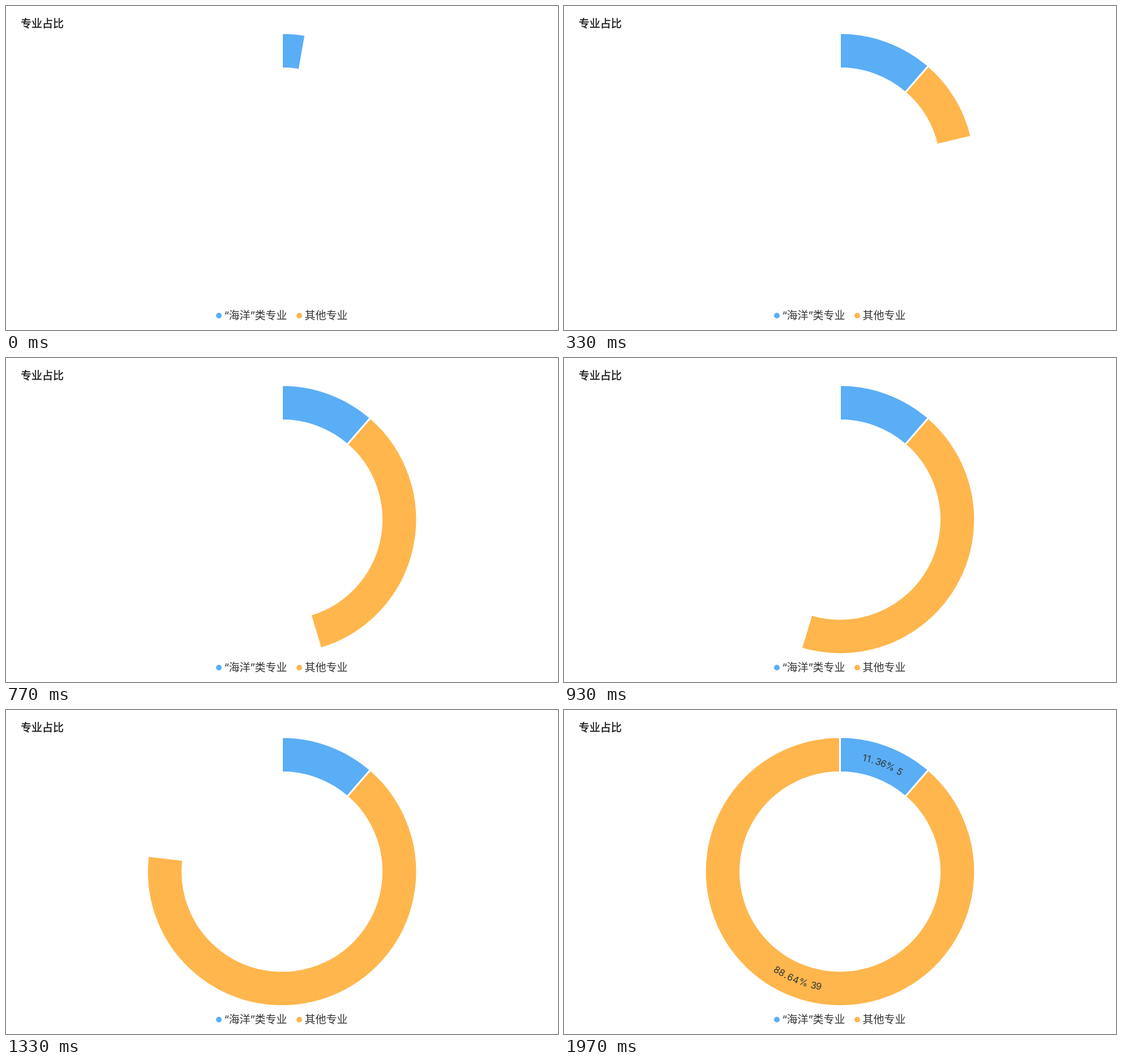
Recreate the animation shown at these times as an HTML page. Size 975 px wide and 574 px high, loop 3010 ms.

```html
<!DOCTYPE html>
<html lang="zh-CN">
<head>
<meta charset="utf-8">
<title>专业占比</title>
<style>
  html, body { margin: 0; width: 100%; height: 100%; overflow: hidden; background: #fff; }
  svg { display: block; width: 975px; height: 574px; }
  text { font: 19px "Noto Sans CJK SC", "Noto Sans CJK", sans-serif; fill: #333; }
  .title { fill: #111; stroke: #111; stroke-width: .35px; }
  .quote { font-family: Inter, sans-serif; }
  #labels text { font: 16.5px Inter, sans-serif; text-anchor: middle; }
  #ring path { stroke: #fff; stroke-width: 3; }
</style>
</head>
<body>
<svg viewBox="0 0 975 574">
  <text class="title" x="26" y="37.8">专业占比</text>
  <g transform="translate(487.5 286.25)">
    <g id="ring"></g>
    <g id="labels"></g>
  </g>
  <circle cx="376" cy="548.5" r="5" fill="#5aaef5"/>
  <text y="555.2"><tspan class="quote" x="385.5">“</tspan><tspan x="393.5">海洋</tspan><tspan class="quote" x="431.5">”</tspan><tspan x="439.5">类专业</tspan></text>
  <circle cx="518" cy="548.5" r="5" fill="#ffb64d"/>
  <text x="527.5" y="555.2">其他专业</text>
</svg>
<script>
const LOOP = 3010, LABELS_AT = 1970, FPS = 30;
const OUTER = 238.3, INNER = 176;
const START_ANGLE = 10, SPEED = 200; // degrees, degrees per second
const SPLIT = 360 * 5 / 44;

const ring = document.getElementById('ring');
const labels = document.getElementById('labels');

function add(parent, tag, attrs, text = '') {
  const node = document.createElementNS('http://www.w3.org/2000/svg', tag);
  for (const key in attrs) node.setAttribute(key, attrs[key]);
  node.textContent = text;
  return parent.appendChild(node);
}

function point(radius, degrees) {
  const a = degrees * Math.PI / 180;
  return `${(radius * Math.sin(a)).toFixed(3)} ${(-radius * Math.cos(a)).toFixed(3)}`;
}

function sector(from, to) {
  if (to <= from) return '';
  const large = to - from > 180 ? 1 : 0;
  return `M${point(OUTER, from)}A${OUTER} ${OUTER} 0 ${large} 1 ${point(OUTER, to)}` +
    `L${point(INNER, to)}A${INNER} ${INNER} 0 ${large} 0 ${point(INNER, from)}Z`;
}

// Sets each character upright on the ring at its own angle.
function arcText(text, angles, y, turn) {
  [...text].forEach((char, i) =>
    add(labels, 'text', { y, transform: `rotate(${angles[i] + turn})` }, char));
}

const slices = [
  { from: 0, to: SPLIT, fill: '#5aaef5' },
  { from: SPLIT, to: 360, fill: '#ffb64d' }
];
for (const slice of slices) slice.path = add(ring, 'path', { fill: slice.fill });

arcText('11.36%5', [12.2, 14.3, 16.4, 19.2, 21.9, 25.6, 30.8], -200.3, 0);
arcText('88.64%39', [212.6, 209.8, 207.4, 205.1, 202.1, 198.2, 193, 190.4], 212.5, -180);

function render(ms) {
  const step = Math.floor((ms + 5) * FPS / 1000);
  const sweep = Math.min(360, START_ANGLE + step * SPEED / FPS);
  for (const { path, from, to } of slices) {
    path.setAttribute('d', sector(from, Math.min(to, sweep)));
  }
  labels.setAttribute('visibility', ms >= LABELS_AT ? 'visible' : 'hidden');
}

const begin = performance.now();
function tick() {
  render((performance.now() - begin) % LOOP);
  requestAnimationFrame(tick);
}
tick();
</script>
</body>
</html>
```
